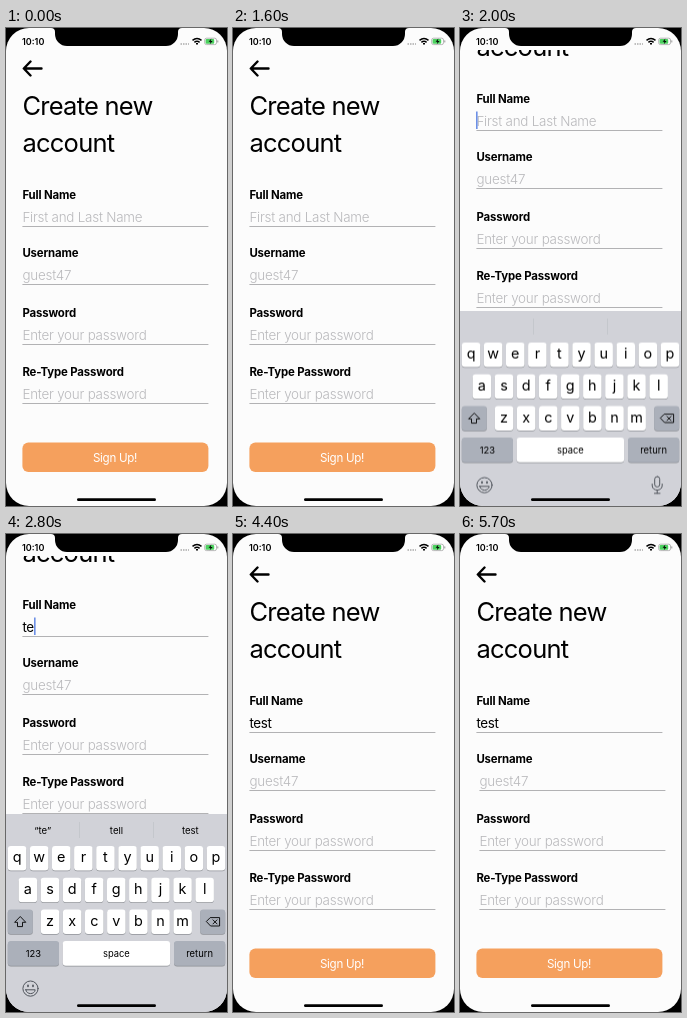
These frames come from a looping animation (221x478 px, 5.8 s). An HTML page:

```html
<!DOCTYPE html>
<html lang="en">
<head>
<meta charset="utf-8">
<title>Create new account</title>
<style>
html, body { margin: 0; width: 100%; height: 100%; overflow: hidden; background: #000; }
svg { display: block; width: 221px; height: 478px; font-family: Inter, "Liberation Sans", sans-serif; }

.title { font-size: 25.5px; letter-spacing: -.75px; }
.label { font-size: 11.4px; font-weight: 700; letter-spacing: -.14px; }
.input { font-size: 13.4px; letter-spacing: -.34px; }
.hint { font-weight: 300; letter-spacing: -.22px; fill: #b9b9bc; }
.rule { fill: #b2b2b4; }
.button { font-size: 11.6px; letter-spacing: -.3px; fill: #fff; text-anchor: middle; }
.clock { font-size: 9px; font-weight: 600; }
.icon { fill: none; stroke: #000; stroke-linecap: round; stroke-linejoin: round; }

.keys { text-anchor: middle; }
.letter { font-size: 14.4px; }
.word { font-size: 9.4px; }
.tip { font-size: 9.6px; opacity: 0; }

.scroll, .keyboard, .shake-all, .shake-empty { animation: 5800ms linear infinite; }
.scroll { animation-name: scroll; }
.keyboard { animation-name: keyboard; }
.shake-all { animation-name: shake-all; }
.shake-empty { animation-name: shake-empty; }
.caret, .typed tspan, .tip, .until-typed { animation: 5800ms step-end infinite; }
.caret { animation-name: caret; }
.until-typed { animation-name: until-typed; }
.typed tspan { fill-opacity: 0; }
.typed tspan:nth-child(1) { animation-name: type1; }
.typed tspan:nth-child(2) { animation-name: type2; }
.typed tspan:nth-child(3) { animation-name: type3; }
.typed tspan:nth-child(4) { animation-name: type4; }
.tip1 { animation-name: tip1; }
.tip2 { animation-name: tip2; }
.tip3 { animation-name: tip3; }
.tip4 { animation-name: tip4; }

@keyframes scroll {
  0% { transform: translateY(0); }
  28.3% { transform: translateY(0); animation-timing-function: cubic-bezier(.2, .8, .2, 1); }
  34.4%, 65.8% { transform: translateY(-96px); }
  65.8% { animation-timing-function: cubic-bezier(.2, .8, .2, 1); }
  74.6%, 100% { transform: translateY(0); }
}
@keyframes keyboard {
  0% { transform: translateY(198px); }
  28.45% { transform: translateY(198px); animation-timing-function: cubic-bezier(.2, .8, .2, 1); }
  37%, 65.8% { transform: translateY(0); }
  65.8% { animation-timing-function: cubic-bezier(.2, .8, .2, 1); }
  74.6%, 100% { transform: translateY(198px); }
}
@keyframes shake-all {
  0%, 5.17% { transform: translateX(0); }
  6.9% { transform: translateX(-3px); }
  8.62% { transform: translateX(9px); }
  10.34% { transform: translateX(0); }
  12.07% { transform: translateX(-5px); }
  13.79% { transform: translateX(10px); }
  15.52% { transform: translateX(3px); }
  17.24%, 100% { transform: translateX(0); }
}
@keyframes shake-empty {
  0%, 86.2% { transform: translateX(0); }
  87.93% { transform: translateX(-4px); }
  89.66% { transform: translateX(5px); }
  91.38% { transform: translateX(10px); }
  93.1% { transform: translateX(-4px); }
  94.83% { transform: translateX(5px); }
  96.55% { transform: translateX(10px); }
  98.28%, 100% { transform: translateX(3px); }
}
@keyframes caret {
  0% { opacity: 0; transform: translateX(0); }
  28.8% { opacity: 1; transform: translateX(0); }
  41.2% { opacity: 1; transform: translateX(4.5px); }
  46.38% { opacity: 1; transform: translateX(12px); }
  53.28% { opacity: 1; transform: translateX(18.8px); }
  56.72% { opacity: 1; transform: translateX(23.4px); }
  61.9%, 100% { opacity: 0; transform: translateX(23.4px); }
}
@keyframes until-typed { 0% { opacity: 1; } 41.2%, 100% { opacity: 0; } }
@keyframes type1 { 0% { fill-opacity: 0; } 41.2%, 100% { fill-opacity: 1; } }
@keyframes type2 { 0% { fill-opacity: 0; } 46.38%, 100% { fill-opacity: 1; } }
@keyframes type3 { 0% { fill-opacity: 0; } 53.28%, 100% { fill-opacity: 1; } }
@keyframes type4 { 0% { fill-opacity: 0; } 56.72%, 100% { fill-opacity: 1; } }
@keyframes tip1 { 0% { opacity: 0; } 41.2% { opacity: 1; } 46.38%, 100% { opacity: 0; } }
@keyframes tip2 { 0% { opacity: 0; } 46.38% { opacity: 1; } 53.28%, 100% { opacity: 0; } }
@keyframes tip3 { 0% { opacity: 0; } 53.28% { opacity: 1; } 56.72%, 100% { opacity: 0; } }
@keyframes tip4 { 0% { opacity: 0; } 56.72%, 100% { opacity: 1; } }
</style>
</head>
<body>
<svg viewBox="0 0 221 478">
  <defs>
    <clipPath id="screen"><rect width="221" height="478" rx="23"/></clipPath>
    <clipPath id="view"><rect y="22" width="221" height="456"/></clipPath>
  </defs>
  <g clip-path="url(#screen)">
    <rect width="221" height="478" fill="#fcfcfc"/>

    <g clip-path="url(#view)">
      <g class="scroll">
        <path class="icon" stroke-width="2.4" d="M35.5 40.5H18M24.5 33.5L17.8 40.5L24.5 47.5"/>
        <text class="title" x="16.4" y="87">Create new</text>
        <text class="title" x="16.4" y="124">account</text>
        <g id="labels" class="label"></g>
        <g class="shake-all">
          <text class="input hint until-typed" x="16.4" y="193.6">First and Last Name</text>
          <text class="input typed" x="16.4" y="193.6"><tspan>t</tspan><tspan>e</tspan><tspan>s</tspan><tspan>t</tspan></text>
          <rect class="rule" x="16.4" y="198" width="186" height="1"/>
          <rect class="caret" x="16.2" y="179.5" width="1.3" height="17.5" fill="#4a76e0"/>
          <g id="empty" class="shake-empty"></g>
        </g>
        <rect x="16.4" y="414.5" width="186" height="29.5" rx="6" fill="#f5a05d"/>
        <text class="button" x="109" y="433.6">Sign Up!</text>
      </g>
    </g>

    <g class="keyboard">
      <rect y="280" width="221" height="200" fill="#d1d2d8"/>
      <path d="M73.5 288V304M147.5 288V304" stroke="#c1c4ca" stroke-width=".8"/>
      <g id="keys" class="keys"></g>
      <path class="icon" stroke-width=".9" d="M14 382.8L8.6 388.3H11.5V392.6H16.5V388.3H19.4Z"/>
      <path class="icon" stroke-width=".9" d="M204.6 383.6H213.6V392H204.6L200.6 387.8ZM207 385.9L211 389.9M211 385.9L207 389.9"/>
      <g class="icon" style="stroke:#50555c" stroke-width="1">
        <circle cx="24.5" cy="454.6" r="7.6"/>
        <path d="M19.8 455.8H29.2C28.6 460.9 20.4 460.9 19.8 455.8Z"/>
        <path stroke-width="1.7" d="M22 451.3V452.3M27 451.3V452.3"/>
        <g class="until-typed">
          <rect x="194.7" y="446" width="5" height="10.4" rx="2.5"/>
          <path d="M192.2 453.5V455C192.2 461 202.2 461 202.2 455V453.5M197.2 459.6V462.8M194.4 462.8H200"/>
        </g>
      </g>
    </g>

    <path d="M45 0A4 4 0 0 1 49 4V6A12 12 0 0 0 61 18H160A12 12 0 0 0 172 6V4A4 4 0 0 1 176 0Z"/>
    <text class="clock" x="16" y="17">10:10</text>
    <path d="M174.5 16H183" stroke="#aaa" stroke-width="1.5" stroke-dasharray="1.5 1"/>
    <g class="icon" stroke-width="1.5" style="stroke-linecap:butt">
      <path d="M186.5 12.4Q191 8.6 195.5 12.4M188.4 14.4Q191 12.2 193.6 14.4"/>
      <path d="M190 15.8H192" stroke-width="1.6"/>
    </g>
    <rect x="198.7" y="10.2" width="11.8" height="6.4" rx="1.8" fill="#fff" stroke="#999" stroke-width=".7"/>
    <rect x="199.6" y="11.1" width="8.6" height="4.6" rx="1" fill="#4cd15f"/>
    <path d="M205.4 10.6L202.6 13.8H204.5L203.8 16.3L206.6 13H204.7Z"/>
    <rect x="211.3" y="12.3" width="1" height="2.3" rx=".5" fill="#999"/>
    <rect x="71" y="470.2" width="79" height="2.9" rx="1.45"/>
  </g>
</svg>
<script>
const fill = (id, parts) => { document.getElementById(id).innerHTML = parts.join(""); };
const text = (cls, x, y, str) => `<text class="${cls}" x="${x}" y="${y}">${str}</text>`;

const LEFT = 16.4;
const fields = [
  { top: 0, label: "Full Name" },
  { top: 58, label: "Username", hint: "guest47" },
  { top: 118, label: "Password", hint: "Enter your password" },
  { top: 177, label: "Re-Type Password", hint: "Enter your password" }
];
fill("labels", fields.map(f => text("", LEFT, 171.4 + f.top, f.label)));
fill("empty", fields.filter(f => f.hint).map(f =>
  text("input hint", LEFT, 193.6 + f.top, f.hint) +
  `<rect class="rule" x="${LEFT}" y="${198 + f.top}" width="186" height="1"/>`));

const rowTop = row => 312 + row * 31.7;
function key(x, row, width, label, cls, color = "#fff") {
  const y = rowTop(row);
  const box = (dy, c) =>
    `<rect x="${x}" y="${y + dy}" width="${width}" height="24.6" rx="3" fill="${c}"/>`;
  const baseline = y + (cls === "word" ? 15.6 : 16.4);
  return box(.7, "#8e9196") + box(0, color) + text(cls, x + width / 2, baseline, label);
}

const GREY = "#abb0ba";
const parts = [];
["qwertyuiop", "asdfghjkl", "zxcvbnm"].forEach((letters, row) => {
  const left = [1.8, 12.6, 34.8][row];
  [...letters].forEach((c, i) => parts.push(key(left + i * 22.1, row, 18.5, c, "letter")));
});
parts.push(
  key(1.8, 2, 25, "", "word", GREY),
  key(194.2, 2, 25, "", "word", GREY),
  key(1.8, 3, 51.2, "123", "word", GREY),
  key(56.7, 3, 107.4, "space", "word"),
  key(168, 3, 51.2, "return", "word", GREY)
);
[
  ["“t”", "the", "to"],
  ["“te”", "tell", "test"],
  ["“tes”", "test", "tests"],
  ["“test”", "testuser", "testing"]
].forEach((words, n) => words.forEach((word, i) =>
  parts.push(text(`tip tip${n + 1}`, 36.7 + i * 73.8, 299.6, word))));
fill("keys", parts);
</script>
</body>
</html>
```
